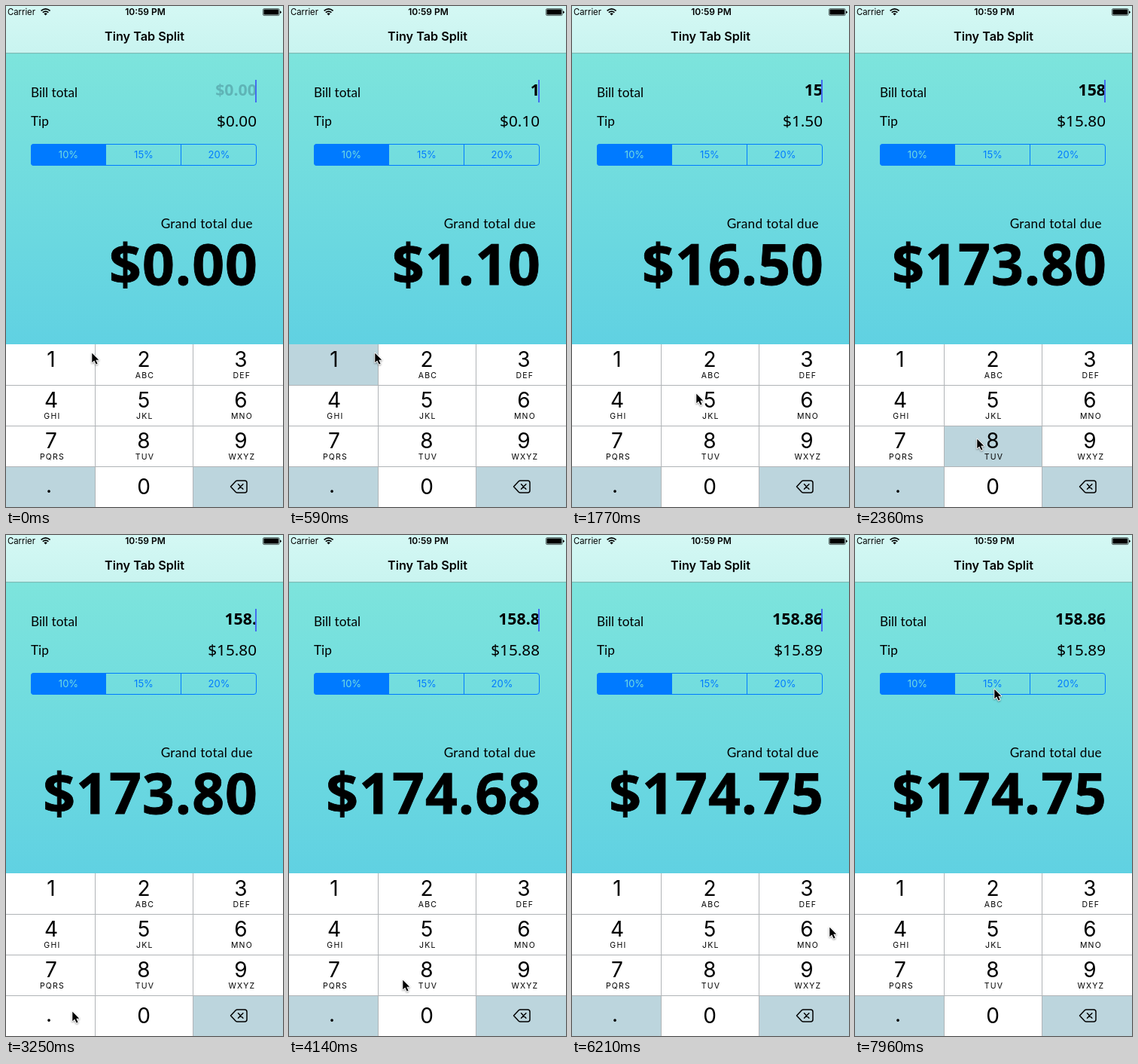
Animation, 368 px wide and 665 px high, one loop 8000 ms. Source, as an HTML page:

```html
<!DOCTYPE html>
<html lang="en">
<head>
<meta charset="utf-8">
<title>Tiny Tab Split</title>
<style>
  html, body { margin: 0; width: 100%; height: 100%; overflow: hidden; background: #62d2e1; }
  svg { display: block; width: 368px; height: 665px; }
  text { font-family: Inter, Roboto, sans-serif; }
  .mid { text-anchor: middle; }
  .end { text-anchor: end; }
  .label { font-family: Lato, "Open Sans", sans-serif; font-size: 17.2px; }
  .amount { font-family: "Noto Sans", "Open Sans", sans-serif; text-anchor: end; }
  .digit { font-size: 28px; }
  .letters { font-size: 10.5px; letter-spacing: 1.2px; }
  .segment { font-size: 13px; fill: #007aff; }
  #bill { font-size: 21.3px; font-weight: 700; }
  #tip { font-size: 20.7px; }
  #total { font-size: 75px; font-weight: 900; letter-spacing: 1px; stroke: #000; stroke-width: .8px; }
  #mouse { filter: drop-shadow(0 1px 1px rgba(0, 0, 0, .4)); }
</style>
</head>
<body>
<svg viewBox="0 0 368 665">
  <defs>
    <linearGradient id="sea" x1="0" y1="0" x2="0" y2="1">
      <stop offset="0" stop-color="#7de4dc"/>
      <stop offset="1" stop-color="#60d1e2"/>
    </linearGradient>
    <linearGradient id="bar" x1="0" y1="0" x2="0" y2="1">
      <stop offset="0" stop-color="#d4f8f4"/>
      <stop offset="1" stop-color="#c9f4f0"/>
    </linearGradient>
  </defs>

  <rect y="62" width="368" height="388" fill="url(#sea)"/>
  <rect width="368" height="62.5" fill="url(#bar)"/>
  <rect y="62.3" width="368" height=".8" fill-opacity=".3"/>

  <text x="2" y="12" font-size="11.3">Carrier</text>
  <g fill="none" stroke="#000" stroke-width="1.7">
    <path d="M46.6 6.4Q52.6 1.2 58.6 6.4M48.8 8.7Q52.6 5.4 56.4 8.7"/>
    <path d="M50.4 10.2Q52.6 8.3 54.8 10.2L52.6 12.6Z" fill="#000" stroke="none"/>
  </g>
  <text class="mid" x="185" y="12" font-size="12" font-weight="600">10:59 PM</text>
  <rect x="341.4" y="3.6" width="21.8" height="9" rx="1.6" fill="none" stroke="#000" stroke-width=".6"/>
  <rect x="342.4" y="4.6" width="19.8" height="7" rx=".8"/>
  <path d="M364 6.5q1.7 .3 1.7 1.7t-1.7 1.7z"/>
  <text class="mid" x="184" y="46" font-size="16.2" font-weight="600">Tiny Tab Split</text>

  <text class="label" x="33" y="121">Bill total</text>
  <text class="label" x="33" y="158.5">Tip</text>
  <text class="label end" x="328" y="295" letter-spacing=".3">Grand total due</text>
  <text class="amount" id="bill" x="333" y="119"></text>
  <text class="amount" id="tip" x="333" y="159.5"></text>
  <text class="amount" id="total" x="335" y="369.5"></text>
  <rect id="caret" x="331" y="98" width="2" height="30" fill="#436df0"/>

  <path d="M133 183H37a4 4 0 0 0-4 4v21a4 4 0 0 0 4 4h96z" fill="#007aff"/>
  <g fill="none" stroke="#007aff">
    <rect x="33.5" y="183.5" width="299" height="28" rx="3.5"/>
    <path d="M232.5 183v29"/>
  </g>
  <text class="segment mid" x="83" y="202" style="fill:#72dde0">10%</text>
  <text class="segment mid" x="183" y="202">15%</text>
  <text class="segment mid" x="283" y="202">20%</text>

  <g id="pad"></g>
  <path d="M118.5 449V665M248.5 449V665M0 503.5H368M0 557.5H368M0 611.5H368"
        stroke="#b0b4b7" fill="none"/>
  <g fill="none" stroke="#000" stroke-width="1.5" stroke-linejoin="round" stroke-linecap="round">
    <path d="M298.5 638L305 631Q306 630 307.5 630H317Q320 630 320 633V643Q320 646 317 646H307.5Q306 646 305 645Z"/>
    <path d="M308.5 634.8l6.4 6.4M314.9 634.8l-6.4 6.4"/>
  </g>

  <path id="mouse" d="M.3 .8V13.2L3.2 10.5L5.6 15.6L7.6 14.7L5.3 9.7H9.2Z"
        stroke="#fff" stroke-width="1.8" stroke-linejoin="round" paint-order="stroke"/>
</svg>

<script>
const LOOP = 8000, TICK = 147.5;
const GRAY = '#bcd5dd', WHITE = '#fff';
const byId = id => document.getElementById(id);
const [bill, tip, total, caret, mouse, pad] =
  ['bill', 'tip', 'total', 'caret', 'mouse', 'pad'].map(byId);

function add(tag, attrs, text = '') {
  const el = document.createElementNS('http://www.w3.org/2000/svg', tag);
  for (const name in attrs) el.setAttribute(name, attrs[name]);
  el.textContent = text;
  return pad.appendChild(el);
}

const columns = [[0, 119, 60], [119, 130, 183], [249, 119, 312]];
const letters = ['', 'ABC', 'DEF', 'GHI', 'JKL', 'MNO', 'PQRS', 'TUV', 'WXYZ'];
const keys = {};
[...'123456789.0<'].forEach((name, i) => {
  const [x, width, center] = columns[i % 3];
  const y = 449 + 54 * Math.floor(i / 3);
  const idle = name === '.' || name === '<' ? GRAY : WHITE;
  const face = add('rect', { x, y, width, height: 54, fill: idle });
  keys[name] = { face, idle, active: idle === GRAY ? WHITE : GRAY };
  if (name === '<') return;
  const drop = name === '0' ? 37 : name === '.' ? 35 : 30;
  add('text', { class: 'digit mid', x: name === '.' ? 57 : center, y: y + drop }, name);
  if (letters[i]) add('text', { class: 'letters mid', x: center + 1.4, y: y + 45 }, letters[i]);
});

// Every table is keyed by tick.
const typed = [[0, ''], [4, '1'], [11, '15'], [16, '158'], [22, '158.'], [26, '158.8'], [33, '158.86']];
const pressed = [[0, ''], [2, '1'], [5, ''], [10, '5'], [12, ''], [15, '8'], [17, ''],
  [21, '.'], [23, ''], [25, '8'], [28, ''], [32, '6'], [35, '']];
const blink = [[0, 1], [1, .5], [2, 0], [4, 1], [7, .5], [8, 0], [11, 1], [38, .5], [39, 0],
  [41, .5], [42, 1], [45, .5], [46, 0], [48, .5], [49, 1], [52, .5], [53, .15], [54, .04]];
const path = [[0, 114, 460], [6, 114, 460], [9, 165, 514], [12, 165, 514], [14, 162, 574],
  [17, 162, 574], [20, 88, 632], [23, 88, 632], [25, 151, 590], [28, 151, 590],
  [30, 342, 520], [44, 342, 520], [52, 187, 207], [54, 185, 204]];

const held = (table, tick) => table.findLast(row => row[0] <= tick)[1];

function mouseAt(tick) {
  const next = path.findIndex(p => p[0] > tick);
  if (next < 0) return path.at(-1).slice(1);
  const a = path[next - 1], b = path[next];
  const u = (tick - a[0]) / (b[0] - a[0]);
  const eased = u * u * (3 - 2 * u);
  return [1, 2].map(i => Math.round(a[i] + (b[i] - a[i]) * eased));
}

const money = n => '$' + n.toFixed(2);
let shown = -1;

function draw(tick) {
  const entry = held(typed, tick), amount = Number(entry), down = held(pressed, tick);
  bill.textContent = entry || '$0.00';
  bill.setAttribute('fill', entry ? '#000' : '#5fb4b6');
  tip.textContent = money(amount * .1);
  total.textContent = money(amount * 1.1);
  caret.setAttribute('opacity', held(blink, tick));
  for (const name in keys) {
    const key = keys[name];
    key.face.setAttribute('fill', name === down ? key.active : key.idle);
  }
  mouse.setAttribute('transform', `translate(${mouseAt(tick)})`);
}

const start = performance.now();
function frame() {
  const time = (performance.now() - start) % LOOP;
  const tick = Math.floor((time + 6) / TICK);
  if (tick !== shown) draw(shown = tick);
  requestAnimationFrame(frame);
}
frame();
</script>
</body>
</html>
```
